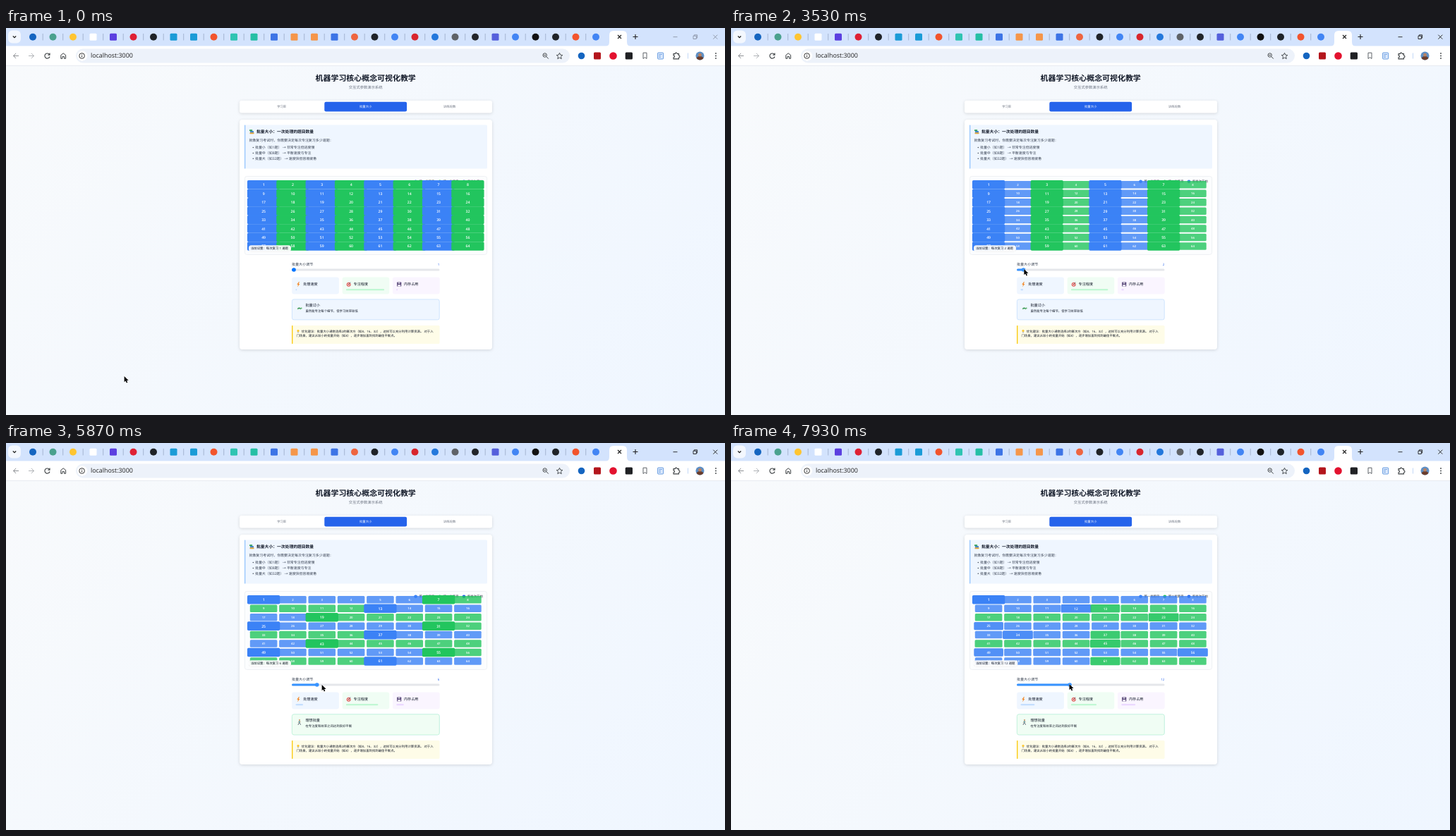
These frames come from a looping animation (1019 by 549 pixels, 8 s). An HTML page:

```html
<!DOCTYPE html>
<html lang="zh-CN">
<head>
<meta charset="utf-8">
<title>批量大小</title>
<style>
  html, body { margin: 0; width: 100%; height: 100%; overflow: hidden; }
  svg { display: block; width: 100%; height: 100%; }
  text {
    font-family: "Open Sans", "Noto Sans CJK SC", "Noto Sans CJK", sans-serif;
    text-rendering: geometricPrecision;
    text-spacing-trim: space-all;
    white-space: pre;
  }
  .card { filter: drop-shadow(0 1.5px 2px #0002); }
</style>
</head>
<body>
<svg id="stage" viewBox="0 0 1019 549"></svg>
<script>
const LOOP = 8000, FADE = 300;
const INK = '#111827', GRAY = '#6b7280', BLUE = '#3b82f6', GREEN = '#22c55e';
const stage = document.getElementById('stage');

// Markup helpers
const rect = (x, y, w, h, fill, r = 0, more = '') =>
  `<rect x="${x}" y="${y}" width="${w}" height="${h}" rx="${r}" fill="${fill}" ${more}/>`;
const dot = (x, y, r, fill, more = '') => `<circle cx="${x}" cy="${y}" r="${r}" fill="${fill}" ${more}/>`;
const line = (d, color, width = 1, more = '') =>
  `<path d="${d}" fill="none" stroke="${color}" stroke-width="${width}" ${more}/>`;
const shape = (d, fill, more = '') => `<path d="${d}" fill="${fill}" ${more}/>`;
// Text is placed by the middle of its glyphs
const text = (x, middle, size, str, fill = INK, more = '') =>
  `<text x="${x}" y="${middle + size * 0.37}" font-size="${size}" fill="${fill}" ${more}>${str}</text>`;
const CENTER = 'text-anchor="middle"', BOLD = 'font-weight="700"';

function browser() {
  // c = circle, s = square
  const icons = ('c1565c0 c4aa18e cffc531 sffffff s5b3fe0 cdf2034 c1f2328 s1a9bd7 s1a9bd7 cf2542d ' +
    's2fc4b2 s25bfa5 s3d74e6 sf5964a sf5964a s3d74e6 cee6540 c1f2328 c4285f4 cd8252d ' +
    'c2478dc c5f6368 c22252a s5560dc c4285f4 c111111 c1f2328 cf2542d c4285f4').split(' ');
  let s = rect(0, 0, 1019, 54, '#d3e3fd') + rect(3, 3.5, 18, 18, '#f3f7fe', 6) +
    line('M9.8 11.5l2.2 2.2 2.2-2.2', '#1f1f1f', 1.2);
  icons.forEach((icon, i) => {
    const x = 38 + 28.5 * i, fill = '#' + icon.slice(1);
    s += icon[0] === 'c' ? dot(x, 12.7, 5, fill) : rect(x - 5, 7.7, 10, 10, fill, 1.5);
    if (i < 28) s += rect(x + 13.7, 8, 1, 9.5, '#a5b5d2');
  });
  s += shape('M849 26q6 0 6-6V10q0-6 6-6h13q6 0 6 6v10q0 6 6 6z', '#fff') +
    line('M867 10l5 5m0-5l-5 5', '#1f1f1f', 1.1) + line('M888.5 12.5h7m-3.5-3.5v7', '#1f1f1f', 1.1) +
    `<g id="controls">${line('M945.5 12.7h6M1002.3 9.7l6 6m0-6l-6 6', 'currentColor', 0.9)}` +
    line('M974 11.2h4.3v4.3H974zM975.3 11V9.8h4.3v4.3h-1.2', 'currentColor', 0.9) + '</g>';

  s += rect(0, 25.5, 1019, 28.5, '#fff') + rect(0, 53.2, 1019, 0.8, '#e3e7ee') +
    line('M18 39.5h-7.5m3.6-3.6l-3.6 3.6 3.6 3.6', '#8f9296', 1) +
    line('M32 39.5h7.5m-3.6-3.6l3.6 3.6-3.6 3.6', '#b0b3b7', 1) +
    line('M61.5 37.5a3.6 3.6 0 1 0 .5 3M62 35.5v2.7h-2.7', '#3c4043', 1.1) +
    line('M77.8 38.5l3.4-2.7 3.4 2.7v4.8h-2.1v-2.7h-2.6v2.7h-2.1z', '#3c4043', 1);
  s += rect(99, 29.5, 700, 20, '#edf2fa', 10) + dot(108, 39.5, 7.2, '#fff') +
    dot(107.6, 39.5, 3.8, 'none', 'stroke="#1f1f1f" stroke-width=".9"') +
    line('M107.6 39v2.4M107.6 37.2v1', '#1f1f1f', 0.9) +
    text(120, 39.2, 8.9, 'localhost:3000', '#1f1f1f') +
    dot(763.7, 38.5, 2.7, 'none', 'stroke="#3c4043"') +
    line('M765.8 40.6l3 3M762.4 38.5h2.6', '#3c4043', 1) +
    line('M784.5 35.3l1.3 2.9 3 .3-2.3 2.1.7 3.1-2.7-1.6-2.7 1.6.7-3.1-2.3-2.1 3-.3z', '#3c4043', 0.9);
  s += dot(815.5, 39.5, 4.8, '#1565c0') + rect(833, 34.5, 10, 10, '#b3161c', 1.5) +
    dot(860.5, 39.5, 5.3, '#e3122f') + rect(877.7, 34.5, 10.3, 10, '#202124', 1.5) +
    line('M903 35.2h5v8.3l-2.5-1.9-2.5 1.9z', '#5f6368', 1) +
    rect(923.6, 35, 8, 9, '#dbe9fc', 1, 'stroke="#5b93dd" stroke-width=".9"') +
    line('M925.3 37.5h4.6m-4.6 2h2.5m-2.5 2h2.5', '#5b93dd', 0.8) +
    line('M946 36.6h2.3a1.5 1.5 0 0 1 3 0h2.2v2.4a1.5 1.5 0 0 1 0 3v1.9H946v-2a1.5 1.5 0 0 0 0-3z', '#3c4043', 1.1) +
    rect(966, 35.5, 1, 8, '#c4d8f6') +
    dot(983.5, 39.5, 6, '#5d8fc5') + shape('M978.7 43a5 4 0 0 1 9.6 0a6 6 0 0 1-9.6 0z', '#6b3d2c') +
    dot(983.5, 38.2, 2.4, '#b98262');
  for (const y of [36, 39.5, 43]) s += dot(1006, y, 0.9, '#3c4043');
  return s;
}

function page() {
  const card = (x, y, w, h, r) => rect(x, y, w, h, '#fff', r, 'class="card"');
  let s = `<defs><linearGradient id="sky" gradientUnits="userSpaceOnUse" x1="130" y1="-80" x2="890" y2="680">
    <stop stop-color="#f8fafc"/><stop offset="1" stop-color="#eff6ff"/></linearGradient></defs>` +
    rect(0, 54, 1019, 495, 'url(#sky)') +
    text(509.7, 71, 10.95, '机器学习核心概念可视化教学', INK, CENTER + BOLD) +
    text(509.7, 83.8, 5.3, '交互式参数演示系统', GRAY, CENTER);
  s += card(331, 103, 358, 17.5, 3) + rect(451.3, 104.8, 116.8, 13.6, '#2563eb', 2.2) +
    text(390.7, 111.6, 4.38, '学习率', GRAY, CENTER) +
    text(509.7, 111.6, 4.38, '批量大小', '#fff', CENTER + 'font-weight="500"') +
    text(628.7, 111.6, 4.38, '训练轮数', GRAY, CENTER);

  s += card(331, 130, 358, 326, 4) + rect(338, 137.5, 344, 62, '#eff6ff', 1.5) +
    rect(338, 137.5, 1.3, 62, '#93c5fd', 0.6) +
    rect(345, 144.2, 4.2, 2, '#2e9e5b', 0.4) + rect(346, 146.2, 5, 2, '#2f78c4', 0.4) +
    rect(345.5, 148.2, 6, 2, '#d9a23c', 0.4) +
    text(355, 147, 5.8, '批量大小：一次处理的题目数量', INK, BOLD) +
    text(344.4, 158.8, 4.98, '就像复习考试时，你需要决定每次专注复习多少道题：', '#374151');
  ['小（如1题） → 非常专注但进度慢', '中（如8题） → 平衡速度与专注', '大（如32题） → 速度快但容易疲惫']
    .forEach((item, i) => {
      const y = 169.5 + 7.9 * i;
      s += dot(350.3, y, 0.75, '#374151') + text(353, y, 4.95, '批量' + item, '#374151');
    });

  s += rect(338.4, 210.4, 343.2, 111, '#fcfdfe', 3, 'stroke="#e8ebf0" stroke-width=".7"');
  [['第一批题目', BLUE], ['第二批题目', GREEN], ['新批次开始', '#2563eb']].forEach(([label, fill], i) => {
    const x = 580.6 + 34.2 * i;
    s += dot(x, 217.8, 2.4, fill, i === 2 ? 'id="pulse"' : '') + text(x + 4.9, 217.8, 4.38, label, '#1f2937');
  });
  s += '<g id="cells"></g>' +
    rect(344, 308.2, 60, 9, '#fff', 3.5, 'id="pill" fill-opacity=".93" style="filter:drop-shadow(0 .4px .6px #0003)"') +
    text(347, 312.8, 4.38, '', INK, 'id="status"');

  s += text(405, 335, 5.05, '批量大小调节', '#374151') +
    text(614.3, 335, 4.5, '', '#2563eb', 'id="count" text-anchor="end"') +
    rect(405, 341.5, 209.5, 3, '#e5e7eb', 1.5) + rect(405, 341.5, 3, 3, '', 1.5, 'id="fill"') +
    dot(408, 343, 2.8, '', 'id="thumb"');

  [['处理速度', '#eff6ff', '#bfdbfe'], ['专注程度', '#f0fdf4', '#bbf7d0'], ['内存占用', '#faf5ff', '#e9d5ff']]
    .forEach(([label, back, bar], i) => {
      const x = 405.2 + 71.4 * i;
      s += rect(x, 353.5, 66.7, 24, back, 3) + text(x + 16, 363, 5.11, label, INK, 'font-weight="500"') +
        rect(x + 5.3, 370.2, 1, 2, bar, 1, `id="bar${i}"`);
    });
  s += shape('M415 360l-2.7 4h1.6l-.7 3.2 3.2-4.3h-1.7l1.2-2.9z', '#f28a2e') +
    dot(485.7, 363.8, 2.9, '#d9433f') + dot(485.7, 363.8, 1.9, '#fff') + dot(485.7, 363.8, 1.1, '#d9433f') +
    line('M485.7 363.8l2.6-3.2', '#4b5563', 0.7) +
    rect(554.2, 360.6, 6, 6, '#4c3a6e', 0.6) + rect(555.5, 360.6, 3.2, 2.2, '#c9c4d6') +
    rect(555.2, 364, 4, 2.6, '#eeeaf5');

  const box = (fill, edge, more = '') =>
    rect(405.4, 384.9, 208.8, 29, fill, 2.6, `stroke="${edge}" stroke-width=".7" ${more}`);
  s += box('#eff6ff', '#bfdbfe') + box('#f0fdf4', '#bbf7d0', 'id="good"') +
    `<g id="turtle">${shape('M412.8 398.3a3 3 0 0 1 5.4 0z', '#2f8f4e') + dot(418.6, 397.6, 1, '#58b368') +
      rect(413.2, 398, 1.3, 1.2, '#58b368') + rect(416.6, 398, 1.3, 1.2, '#58b368')}</g>` +
    `<g id="walker">${dot(416, 392.9, 1, '#c98f5f') + line('M415.9 394.2l-.3 2.6', '#4aa3b8', 1.6) +
      line('M415.6 396.6l-1.7 3.4M415.7 396.6l2 3.2', '#5a5f6b', 0.9) +
      line('M415.4 394.6l-1.6 2M416.2 394.6l1.8 1.6', '#c98f5f', 0.6)}</g>` +
    text(424.5, 393.3, 5.11, '', INK, 'id="verdict" font-weight="500"') +
    text(424.5, 401.3, 4.38, '', INK, 'id="advice"');

  s += rect(405, 422, 209.5, 26, '#fefce8', 1.5) + rect(405, 422, 1.4, 26, '#facc15', 0.6) +
    dot(414, 429.5, 1.6, '#fbc62f') + rect(413.2, 431, 1.6, 1.4, '#a3a8b0') +
    text(418.8, 430.2, 4.38, '优化建议：批量大小通常选择2的幂次方（如8、16、32），这样可以充分利用计算资源。 对于入') +
    text(411.4, 436.2, 4.38, '门场景，建议从较小的批量开始（如8），逐步增加直到找到最佳平衡点。');
  return s;
}

const pointer = '<path id="pointer" d="M0 0v8.2l1.9-1.7 1.3 2.9 1.5-.7-1.3-2.8h2.6z" ' +
  'fill="#000" stroke="#fff" stroke-width=".6" paint-order="stroke"/>';
stage.innerHTML = page() + browser() + pointer;

const $ = id => document.getElementById(id);
const set = (node, attrs) => { for (const key in attrs) node.setAttribute(key, attrs[key]); };

$('cells').innerHTML = Array.from({ length: 64 }, (_, i) =>
  `<g>${rect(-19.3, -5.25, 38.6, 10.5, BLUE, 1.5)}${text(0, 0.1, 4.3, i + 1, '#fff', CENTER + 'font-weight="600"')}</g>`).join('');
const cells = [...$('cells').children];

// [time, batch size]
const sizes = [[0, 1], [2940, 2], [4400, 4], [5400, 5], [5540, 6], [5930, 7], [6270, 8],
  [6400, 9], [6800, 10], [7660, 11], [7865, 12]];
// [time, x, y]
const route = [[0, 167, 494.5], [330, 373, 370], [470, 373, 370], [1270, 397, 361], [1730, 409, 341],
  [1870, 409, 341], [2070, 411, 341], [2330, 412, 342], [2730, 412, 342], [3270, 415, 342], [4070, 416, 342],
  [4400, 426, 343.5], [5070, 427, 343.5], [5400, 432.5, 343.5], [5540, 440, 343], [5930, 449, 343],
  [6270, 456.5, 342.5], [6800, 467.5, 341], [7130, 470, 341], [7470, 472, 341], [7600, 475, 342], [7930, 479.5, 342]];

const ease = x => 1 - (1 - Math.min(x, 1)) ** 2;

// Value of prop(size) at time t, easing after every change of size
function eased(prop, t) {
  let value = prop(1);
  sizes.forEach(([at, size], i) => {
    if (at > t) return;
    const end = Math.min(t, sizes[i + 1]?.[0] ?? t);
    value += (prop(size) - value) * ease((end - at) / FADE);
  });
  return value;
}

function pointerAt(t) {
  const i = route.findIndex(stop => stop[0] > t);
  if (i < 0) return route.at(-1).slice(1);
  const [t0, x0, y0] = route[i - 1], [t1, x1, y1] = route[i];
  const k = (t - t0) / (t1 - t0);
  return [x0 + (x1 - x0) * k, y0 + (y1 - y0) * k];
}

function draw(t) {
  const size = sizes.findLast(([at]) => at <= t)[1];
  const ideal = size >= 4, pressed = t >= 2270;

  cells.forEach((cell, i) => {
    const start = eased(n => i % n === 0 ? 1 : 0, t);
    const x = 365.1 + 41.33 * (i % 8), y = 222.3 + 12.45 * Math.floor(i / 8);
    set(cell, { transform: `translate(${x} ${y}) scale(${1 + 0.2 * start})`, opacity: 0.8 + 0.2 * start });
    set(cell.firstChild, { fill: Math.floor(i / size) % 2 ? GREEN : BLUE });
  });
  set($('pulse'), { opacity: 0.75 + 0.25 * Math.cos((t - 1900) / 1000 * Math.PI) });

  $('status').textContent = `当前设置：每次复习 ${size} 道题`;
  set($('pill'), { width: size > 9 ? 62.4 : 60 });
  $('count').textContent = size;

  const thumbX = 408 + 6.55 * (size - 1);
  const accent = pressed ? '#3793ff' : t > 1700 ? '#005cc8' : '#0075ff';
  set($('thumb'), { cx: thumbX, fill: accent });
  set($('fill'), { width: thumbX - 405, fill: accent });

  const load = eased(n => n / 32, t);
  [load, 1 - load, load].forEach((share, i) => set($('bar' + i), { width: 56 * share }));

  set($('good'), { opacity: eased(n => n >= 4 ? 1 : 0, t) });
  set($('turtle'), { opacity: ideal ? 0 : 1 });
  set($('walker'), { opacity: ideal ? 1 : 0 });
  $('verdict').textContent = ideal ? '理想批量' : '批量过小';
  $('advice').textContent = ideal ? '在专注度和效率之间达到良好平衡' : '虽然能专注每个细节，但学习效率较低';

  set($('controls'), { color: pressed ? '#1f1f1f' : '#8b94a5' });
  set($('pointer'), { transform: `translate(${pointerAt(t)})` });
}

function tick() {
  draw(performance.now() % LOOP);
  requestAnimationFrame(tick);
}
tick();
</script>
</body>
</html>
```
